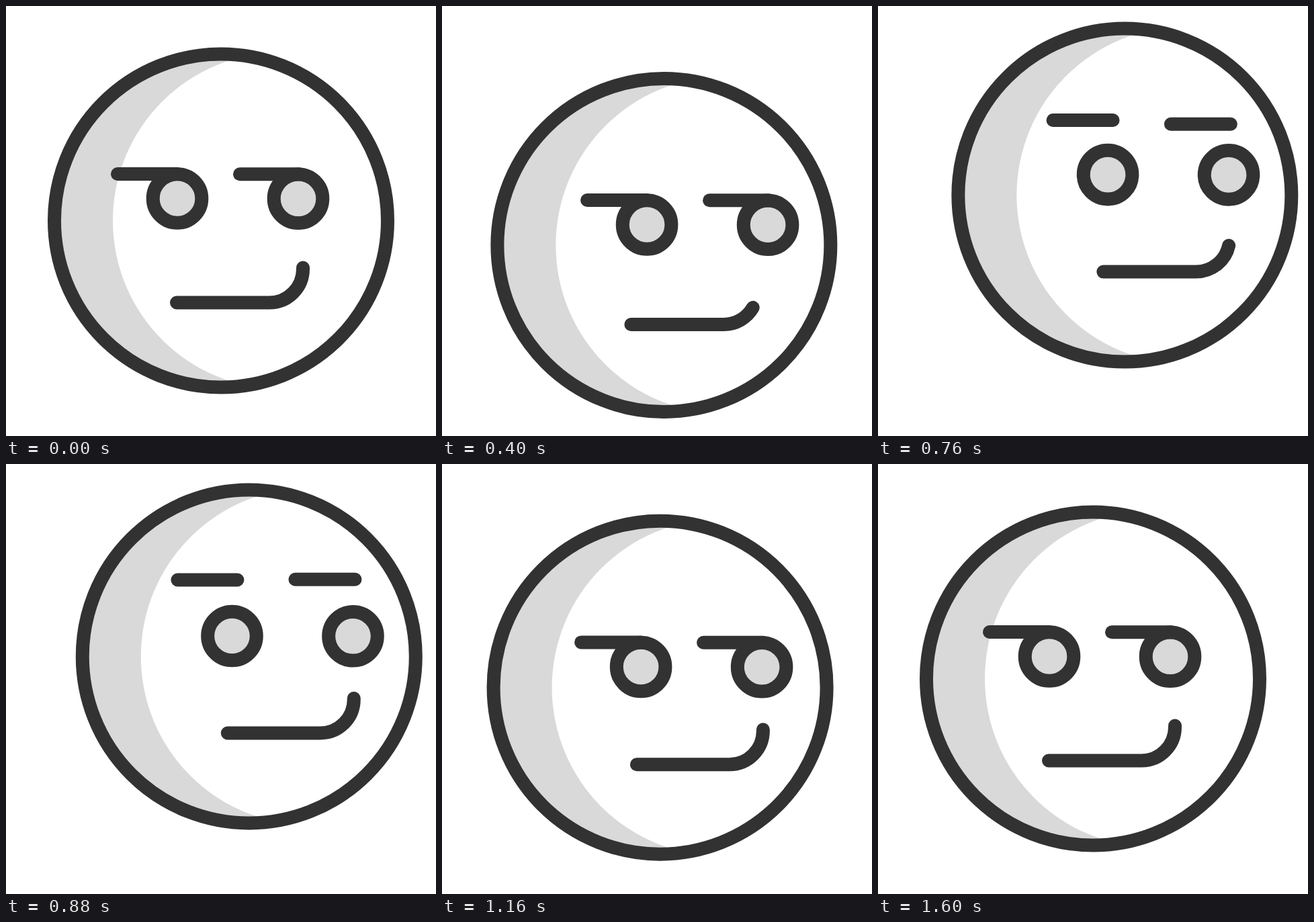
An HTML page for the animation above (2 s loop, 640 px wide and 640 px high).

```html
<!DOCTYPE html>
<html lang="en">
<head>
<meta charset="utf-8">
<title>Smirking face</title>
<style>
  html, body { margin: 0; width: 100%; height: 100%; overflow: hidden; background: #fff; }
  svg { display: block; width: 100vw; height: 100vh; }
  .line { fill: none; stroke: #323232; stroke-width: 20; stroke-linecap: round; stroke-linejoin: round; }
  .grey { fill: #d9d9d9; }
</style>
</head>
<body>
<svg viewBox="0 0 640 640">
  <defs><clipPath id="disc"><circle r="248"/></clipPath></defs>
  <g id="face">
    <g clip-path="url(#disc)">
      <circle class="grey" r="248"/>
      <circle cx="89.7" r="250.7" fill="#fff"/>
    </g>
    <circle class="line" r="248"/>
    <g id="eyes">
      <circle class="line grey" cx="-65" cy="-33" r="36.3" style="fill:#d9d9d9"/>
      <circle class="line grey" cx="115" cy="-32.7" r="36.3" style="fill:#d9d9d9"/>
      <path class="line" id="browL" d="M-154-69.5h89"/>
      <path class="line" id="browR" d="M28-69.2h89"/>
    </g>
    <path class="line" id="mouth"/>
  </g>
</svg>
<script>
const LOOP = 2000, STEP = 40;
const $ = id => document.getElementById(id);

// Hermite ease from 0 to 1 with start slope a and end slope b.
const ease = (u, a = 0, b = 0) =>
  u * u * (3 - 2 * u) + a * u * (1 - u) ** 2 - b * u * u * (1 - u);

const ramp = (t, from, to) =>
  ease(Math.min(1, Math.max(0, (t - from) / (to - from))));

// Rises over a..b, stays, falls over c..d.
const pulse = (t, a, b, c, d) => ramp(t, a, b) - ramp(t, c, d);

// start time, x, y, slope out, slope in at the next point, sideways bow
const route = [
  [0, 320, 319.5, 0, 0, 0],
  [333, 328, 360, 0, 0.4, 2],
  [800, 369, 277.5, 0.43, 0, 0],
  [1200, 323.5, 334, 0, 0, 0],
  [1600, 320, 319.5, 0, 0, 0],
  [LOOP, 320, 319.5, 0, 0, 0]
];

function facePos(t) {
  let i = 0;
  while (t >= route[i + 1][0]) i++;
  const [t0, x0, y0, a, b, bow] = route[i];
  const [t1, x1, y1] = route[i + 1];
  const f = ease((t - t0) / (t1 - t0), a, b);
  return [x0 + (x1 - x0) * f + 4 * bow * f * (1 - f), y0 + (y1 - y0) * f];
}

// A straight lip and a quarter turn, shortened at the curled end.
function mouthPath(cut) {
  const r = 50, tail = 2;
  const angle = Math.min(Math.PI / 2, Math.PI / 2 - (cut - tail) / r);
  const x = 72 + r * Math.sin(angle), y = 72 + r * Math.cos(angle);
  return `M-66 122H72A${r} ${r} 0 0 0 ${x} ${y}v${-Math.max(0, tail - cut)}`;
}

const move = (id, x, y) => $(id).setAttribute("transform", `translate(${x} ${y})`);

function draw(t) {
  move("face", ...facePos(t));

  const look = pulse(t, 0, 333, 1067, 1600);
  move("eyes", 39.7 * look, 2.5 * look);

  const left = pulse(t, 533, 800, 867, 1120);
  const right = pulse(t, 567, 833, 893, 1150);
  move("browL", 8 * left, -47.4 * left);
  move("browR", right, -48 * right);

  const slide = pulse(t, 267, 533, 1067, 1600);
  move("mouth", 34 * slide, -8 * slide);
  $("mouth").setAttribute("d", mouthPath(40 * pulse(t, 167, 533, 533, 900)));
}

const start = performance.now();
function tick() {
  const t = (performance.now() - start) % LOOP;
  draw(Math.floor(t / STEP) * STEP);
  requestAnimationFrame(tick);
}
tick();
</script>
</body>
</html>
```
